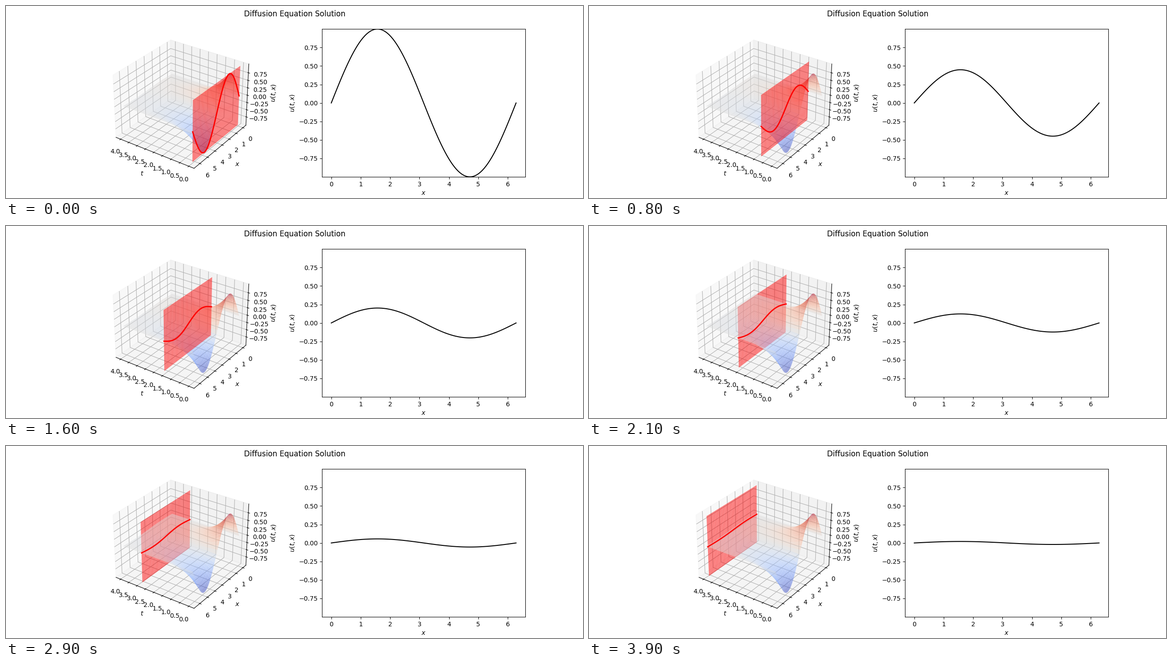
A matplotlib script that plays this animation: 1280 px wide and 427 px high, repeating every 4000 ms.

```python
import numpy as np
import matplotlib.pyplot as plt
from matplotlib.animation import FuncAnimation
from mpl_toolkits.mplot3d.art3d import Poly3DCollection

FRAMES = 40
STEP = 0.1

x = np.linspace(0, 2 * np.pi, 100)
t = np.linspace(0, 4, FRAMES + 1)
T, X = np.meshgrid(t, x)
U = np.exp(-T) * np.sin(X)
u_min, u_max = U.min(), U.max()


def padded(low, high, margin):
    """Widen a range by a data margin plus the gap between box and data."""
    pad = margin * (high - low)
    low, high = low - pad, high + pad
    gap = (high - low) / 48
    return low - gap, high + gap


def sheet_quads(n=50):
    """Quads of an upright x-u plane at t = 0."""
    xs = np.linspace(0, 2 * np.pi, n)
    us = np.linspace(u_min, u_max, n)
    x0, u0 = (g.ravel() for g in np.meshgrid(xs[:-1], us[:-1]))
    x1, u1 = (g.ravel() for g in np.meshgrid(xs[1:], us[1:]))
    zero = np.zeros_like(x0)
    corners = [(x0, u0), (x1, u0), (x1, u1), (x0, u1)]
    return np.stack([np.column_stack([zero, a, b]) for a, b in corners], axis=1)


# The small excess keeps the pixel height from rounding down to 426.
fig = plt.figure(figsize=(12.8, 4.27001), dpi=100)
fig.suptitle("Diffusion Equation Solution")

# Surface view
ax3d = fig.add_subplot(121, projection="3d")
ax3d.plot_surface(T, X, U, cmap="coolwarm", alpha=0.5, linewidth=0)
quads = sheet_quads()
sheet = Poly3DCollection(quads, facecolors="red", alpha=0.5, linewidths=0)
ax3d.add_collection3d(sheet)
slice_line, = ax3d.plot(0 * x, x, np.sin(x), color="red", lw=2, zorder=10)

ax3d.view_init(elev=30, azim=125)
ax3d.set_xlim(*padded(0, 4, 0.05), view_margin=0)
ax3d.set_ylim(*padded(0, 2 * np.pi, 0.05), view_margin=0)
ax3d.set_zlim(*padded(u_min, u_max, 0), view_margin=0)
ax3d.set_xticks(np.arange(0, 4.1, 0.5))
ax3d.set_yticks(range(7))
ax3d.set_zticks(np.arange(-0.75, 0.8, 0.25))
ax3d.set_xlabel("$t$")
ax3d.set_ylabel("$x$")
ax3d.set_zlabel("$u(t,x)$")

# Profile view
ax = fig.add_subplot(122)
profile, = ax.plot(x, np.sin(x), color="black")
ax.set_ylim(u_min, u_max)
ax.set_xlabel("$x$")
ax.set_ylabel("$u(t,x)$")


def update(i):
    now = i * STEP
    u = np.exp(-now) * np.sin(x)
    sheet.set_verts(quads + np.array([now, 0, 0]))
    slice_line.set_data_3d(np.full_like(x, now), x, u)
    profile.set_ydata(u)
    return sheet, slice_line, profile


anim = FuncAnimation(fig, update, frames=FRAMES, interval=100,
                     init_func=lambda: update(0), repeat=True, blit=False)
plt.show()
```
